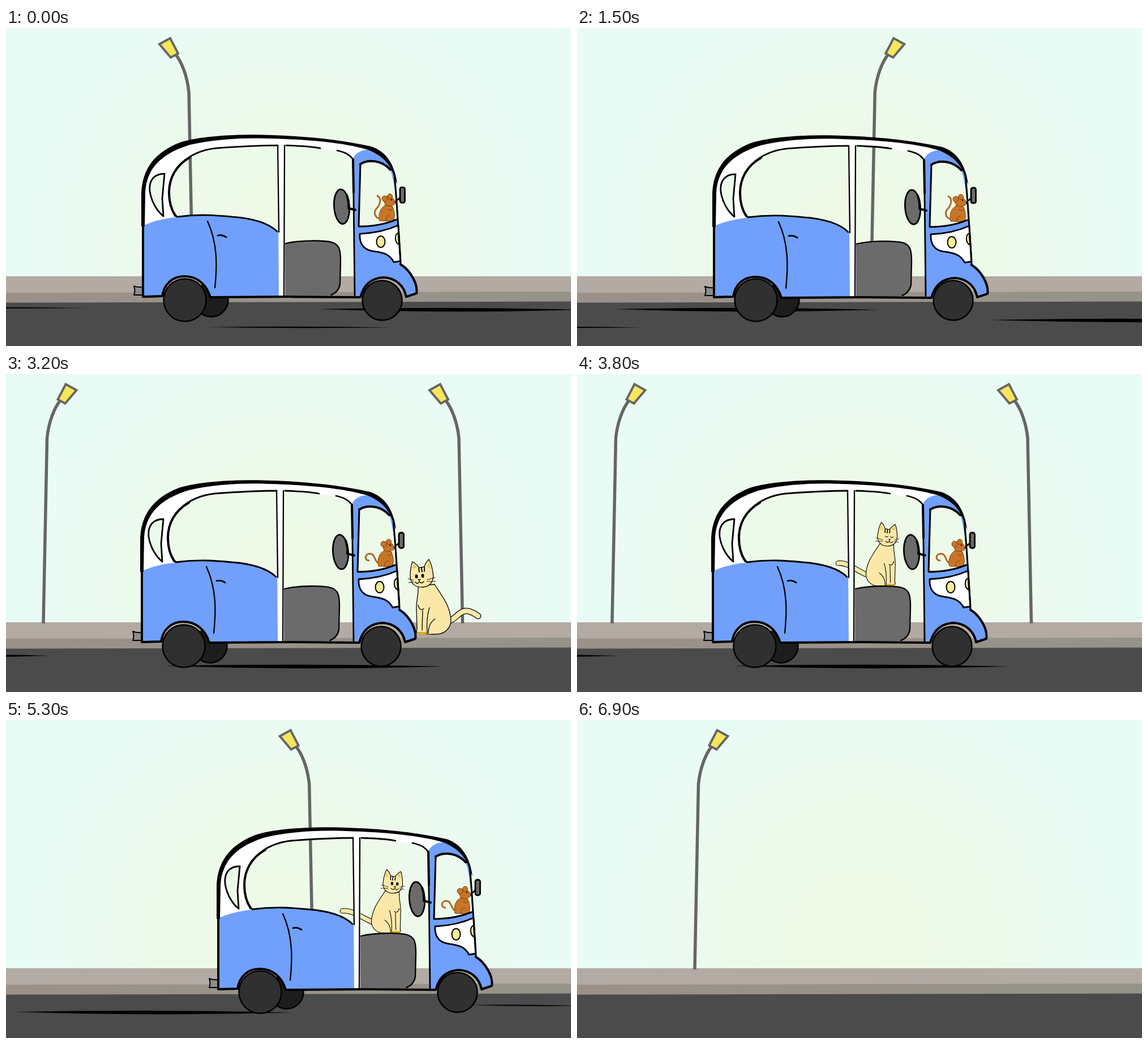
Write an HTML page that moves like this. It is 998 px wide and 561 px high and loops after 7000 ms.

```html
<!DOCTYPE html>
<html lang="en">
<head>
<meta charset="utf-8">
<title>Mouse taxi</title>
<style>
  html, body { margin: 0; width: 100%; height: 100%; overflow: hidden; }
  svg { display: block; width: 998px; height: 561px; }
  .ink { fill: none; stroke: #000; stroke-width: 2.8; stroke-linecap: round; stroke-linejoin: round; }
  .thin { stroke-width: 1.3; }
  .bold { stroke-width: 4; }
  .blue { fill: #70a0fb; }
  .grey { fill: #6b6b6b; }
  .cream { fill: #fbe8a8; }
  .fur { fill: #c97526; stroke: #7c4211; stroke-width: 1; }
</style>
</head>
<body>
<svg viewBox="0 0 998 561">
  <defs>
    <radialGradient id="glow" gradientUnits="userSpaceOnUse" cx="500" cy="390" r="440">
      <stop offset="0" stop-color="#eefae5"/>
      <stop offset=".5" stop-color="#edfaea"/>
      <stop offset="1" stop-color="#e9fbf5"/>
    </radialGradient>
    <linearGradient id="curb">
      <stop offset="0" stop-color="#9b9189"/>
      <stop offset="1" stop-color="#95938a"/>
    </linearGradient>
    <g id="lamp" stroke="#666" fill="none">
      <path d="M6.500,440 L0,113 C-3,84 -13,59 -24,46" stroke-width="5.500"/>
      <path d="M-52,28.500 L-33,18 L-19,45 L-32,52 Z" fill="#f7e65c" stroke-width="4"/>
    </g>
  </defs>

  <rect width="998" height="561" fill="url(#glow)"/>
  <path d="M0,438 H998 V470 H0 Z" fill="#b2aaa3"/>
  <path d="M0,467 L998,465 V490 H0 Z" fill="url(#curb)"/>
  <path d="M0,484.500 L998,482.500 V561 H0 Z" fill="#4b4b4b"/>
  <g id="lamps"></g>
  <g id="streaks"></g>

  <g id="cat">
    <g fill="none" stroke-linecap="round">
      <path class="tail" stroke="#000" stroke-width="11"/>
      <path class="tail" stroke="#fbe8a8" stroke-width="8.500"/>
    </g>
    <path class="ink thin cream" d="M728,374 C729,390 724,402 725,415 L726,450 Q723,459 733,458 L742,458 Q748,460 756,459 C772,460 784,452 786,436 C785,408 770,392 757,371 Z"/>
    <path class="ink thin" d="M728,408 Q731,419 738,414 M736,417 L735,452 M748,412 Q742,432 744,457 M758,432 Q746,440 746,457"/>
    <path d="M728,457 h3 m2,0 h3 m2,0 h3" stroke="#d9a900" stroke-width="4" stroke-linecap="round"/>
    <g id="head">
      <path class="ink thin cream" d="M714,356 Q714,342 718,331 Q726,336 730,342 L739,340 Q742,331 747,327 Q752,336 754,350 C757,364 750,375 737,376 C723,377 714,370 714,356 Z"/>
      <path d="M718,344 L720,335 L726,341 Z M744,340 L747,332 L750,344 Z" fill="#eec45b"/>
      <path class="ink" style="stroke-width:1.800" d="M729,343 l1,6 M734,342 l1,7 M739,341 l0,7"/>
      <g id="eyesOpen"><ellipse cx="725" cy="357" rx="2.500" ry="3.500"/><ellipse cx="736" cy="356" rx="2.500" ry="3.500"/></g>
      <path id="eyesShut" class="ink thin" d="M722,357 q3,3 6,0 M733,356 q3,3 6,0"/>
      <path d="M727,362 h6 l-3,3 Z"/>
      <path class="ink thin" d="M723,367 q4,5 7,-1 q4,5 8,0"/>
      <path class="ink" style="stroke-width:.9" d="M720,364 L710,361 M720,367 L711,368 M744,363 L758,359 M744,366 L759,366"/>
    </g>
  </g>

  <g id="bus">
    <circle cx="362.500" cy="479.500" r="30" stroke="#000" stroke-width="2.500" fill="#1d1d1d"/>
    <g id="shell">
      <path class="ink" style="fill:#8d8d8d;stroke-width:2" d="M226,455 Q233,458 242,457 L242,471 L226,471 Q229,463 226,455 Z"/>
      <!-- mouse -->
      <g>
        <g fill="none" stroke="#b5651d" stroke-width="3" stroke-linecap="round">
          <path id="tailUp" d="M664,337 C650,336 649,324 655,318 C661,311 664,300 656,296"/>
          <path id="tailDown" d="M666,336 C650,336 657,318 644,318 C635,319 635,330 643,330"/>
        </g>
        <path class="fur" d="M671,312 C661,317 657,328 660,340 L684,341 Q689,330 683,315 Z"/>
        <path class="fur" d="M667,304 C668,296 680,294 684,301 L689,307 C688,313 676,316 670,312 Z"/>
        <circle class="fur" cx="669" cy="301" r="5"/>
        <circle class="fur" cx="678" cy="297" r="4.500"/>
        <path d="M675,319 q4,5 8,0 M671,340 q-1,-10 7,-9" fill="none" stroke="#7c4211"/>
        <circle cx="681" cy="303" r="1.300"/>
        <circle cx="688" cy="307" r="1.300"/>
      </g>
      <!-- roof and rear pillar -->
      <path fill="#fff" fill-rule="evenodd" d="M243,350 V290 C244,252 265,222 310,204 C350,190 430,190 470,192 C540,194 600,202 645,214 L613,230 C585,213 540,208 490,207 C450,207 410,209 370,212 C320,218 288,250 288,290 C288,312 294,324 304,336 Z
        M280,257 C262,257 252,268 254,288 C257,308 268,324 278,332 L276,300 Z"/>
      <path class="blue" d="M244,348 C265,338 290,335 305,333 C340,328 370,331 400,333 C440,336 470,348 482,362 V474 H361 C355,449 336,437 315,438 C292,440 279,455 275,472 H244 Z"/>
      <path class="grey" d="M492,381 C520,374 560,374 576,378 C589,382 591,392 591,410 L590,452 C588,467 578,472 560,473 L492,474 Z"/>
      <path fill="#fff" d="M480,207 H493 V474 H482 Z"/>
      <!-- front -->
      <path class="blue" fill-rule="evenodd" d="M612,232 C618,218 634,212 650,216 C675,226 684,246 688,275 L697,416 C715,425 730,455 724,469 L706,474 C702,452 686,440 666,440 C646,441 632,453 627,473 H616 Z
        M626,240 C640,231 664,233 679,250 C687,275 690,310 690,338 C670,345 648,350 623,350 Z"/>
      <path class="ink" style="fill:#fff" d="M625,363 C650,362 675,356 693,348 L697,411 L685,413 C676,396 662,396 645,393 C630,390 624,378 625,363 Z"/>
      <ellipse class="ink" cx="662" cy="377" rx="7.500" ry="10" style="fill:#f7ee91;stroke-width:2"/>
      <path class="ink" d="M693,361 C686,364 686,378 694,382 Z" style="fill:#f7ee91;stroke-width:2"/>
      <!-- ink lines -->
      <path d="M239,350 V290 C241,250 261,220 307,202 C350,188 430,187 470,189 C540,191 600,199 645,209 C675,219 687,245 691,275 L686,264 C680,242 668,227 640,215 C600,203 540,197 470,195 C430,193 370,195 325,206 C272,222 248,250 246,290 L245,350 Z"/>
      <path class="ink bold" d="M242,345 V474 L276,473 C279,452 294,438 315,438 C338,438 354,452 361,475 L500,474 L626,475 C632,452 647,441 667,440 C688,441 703,454 707,474 L725,468 C728,452 714,427 697,417"/>
      <path class="ink" d="M480,207 C440,207 410,209 370,212 C320,218 288,250 288,290 C288,312 294,324 302,333 C340,328 370,330 400,333 C440,336 465,345 479,359"/>
      <path class="ink bold" d="M325,228 C300,242 288,265 288,290 C288,308 293,322 299,331"/>
      <path class="ink" d="M280,257 C262,257 252,268 254,288 C257,308 268,324 278,332 L276,300 Z"/>
      <path class="ink" style="stroke-width:2.300" d="M480,207 L482,360 M492,207 L491,474 L487,474 M356,341 C374,380 373,420 369,458 M494,380 C520,374 560,374 576,378 C589,382 591,392 591,410 L590,452 C588,463 582,468 574,471"/>
      <path class="ink" d="M374,366 Q382,364 389,369 M495,207 C525,208 540,209 555,212 M585,216 C600,219 608,224 613,232 L614,300 L616,472"/>
      <path class="ink bold" d="M613,232 L614,290 M626,240 C640,231 664,233 679,250"/>
      <path class="ink" style="stroke-width:3" d="M626,240 L623,350 C648,350 670,346 689,338 M686,258 C690,300 693,350 697,416"/>
      <ellipse class="ink grey" cx="593" cy="315" rx="13.500" ry="30.500" transform="rotate(-4 593 315)"/>
      <path class="ink bold" d="M602,295 Q606,306 605,318 L617,321"/>
      <rect class="ink grey" x="696" y="281" width="8.500" height="27" rx="3"/>
      <path class="ink" d="M696,299 L692,303"/>
    </g>
    <g stroke="#000" stroke-width="2.500" fill="#303030">
      <circle cx="316" cy="480" r="37.500"/>
      <circle cx="664.500" cy="480.500" r="35"/>
    </g>
  </g>
</svg>
<script>
const $ = id => document.getElementById(id);
const place = (el, value) => el.setAttribute('transform', value);
const show = (el, on) => el.style.display = on ? '' : 'none';

const make = (parent, tag, attrs) => {
  const el = document.createElementNS('http://www.w3.org/2000/svg', tag);
  for (const key in attrs) el.setAttribute(key, attrs[key]);
  return parent.appendChild(el);
};

// Pole position on the street, and which way the lamp faces
const lamps = [[323, 1], [1010, -1], [1737.5, 1], [2423, -1]].map(([x, side]) =>
  ({ x, side, el: make($('lamps'), 'use', { href: '#lamp' }) }));

// Start, end, height, thickness and relative speed of the road streaks
const streaks = [
  [-240, 143, 493, 3, 1], [355, 680, 527.5, 3, 1.17], [550, 1015, 496, 8, 1],
  [1215, 1708, 515, 8, 1], [2020, 2206, 503, 3, 1]
].map(([a, b, y, h, rate]) => {
  const mid = (a + b) / 2;
  const d = `M${a},${y} Q${mid},${y - h * .6} ${b},${y + 1} Q${mid},${y + h} ${a},${y}`;
  return { rate, el: make($('streaks'), 'path', { d }) };
});

// Curve points of the cat's tail at both ends of its swing
const standingTail = { low: [800, 432, 802, 404, 834, 427], high: [806, 428, 796, 388, 828, 396] };
const seatedTail = { low: [800, 432, 822, 410, 846, 413], high: [799, 425, 801, 392, 776, 381] };

const LOOP = 7000, SPEED = .3225, BRAKE = 2614, STOP = 3200, START = 3450, BOARD = 3700, LEAVE = 4500;

function scrollAt(t) {
  const braking = Math.min(Math.max(t - BRAKE, 0), STOP - BRAKE);
  const go = Math.max(t - START, 0) / (6900 - START);
  return SPEED * (Math.min(t, BRAKE) + braking - braking ** 2 / (2 * (STOP - BRAKE))) + 1271 * go ** 2.52;
}

const wave = (t, peak, period) => Math.cos((t - peak) / period * 2 * Math.PI);

function drawTail({ low, high }, lift) {
  const points = low.map((v, i) => v + (high[i] - v) * lift);
  for (const el of document.querySelectorAll('.tail')) el.setAttribute('d', `M780,437 C${points}`);
}

function draw(t) {
  const scroll = scrollAt(t);
  for (const { x, side, el } of lamps) place(el, `translate(${x - scroll} 0) scale(${side} 1)`);
  for (const { rate, el } of streaks) place(el, `translate(${-scroll * rate} 0)`);

  const parked = t > 2900 && t < 4000;
  const busX = 133 * (Math.max(t - LEAVE, 0) / 800) ** 2 - (parked ? 2 : 0);
  const bob = parked ? -1 : wave(t, 5300, 1250);
  place($('bus'), `translate(${busX} 0)`);
  place($('shell'), `translate(0 ${bob})`);

  const seated = t >= BOARD;
  place($('cat'), seated
    ? `translate(${565 + busX} ${375 + bob}) scale(-.85 .85) translate(-724 -459)`
    : `translate(${(scrollAt(STOP) - scroll) * .684} 0)`);
  place($('head'), `translate(${seated ? 7 : 0} 0)`);
  if (seated) drawTail(seatedTail, .5 - .5 * wave(t, 5300, 1600));
  else drawTail(standingTail, .5 - .5 * wave(t, 3200, 2000));

  const shut = seated && t < 4900;
  show($('eyesShut'), shut);
  show($('eyesOpen'), !shut);
  show($('tailUp'), t < 2800);
  show($('tailDown'), t >= 2800);
}

const begin = performance.now();
function tick() {
  const t = (performance.now() - begin) % LOOP;
  draw(Math.floor(t / 100) * 100);
  requestAnimationFrame(tick);
}
tick();
</script>
</body>
</html>
```
